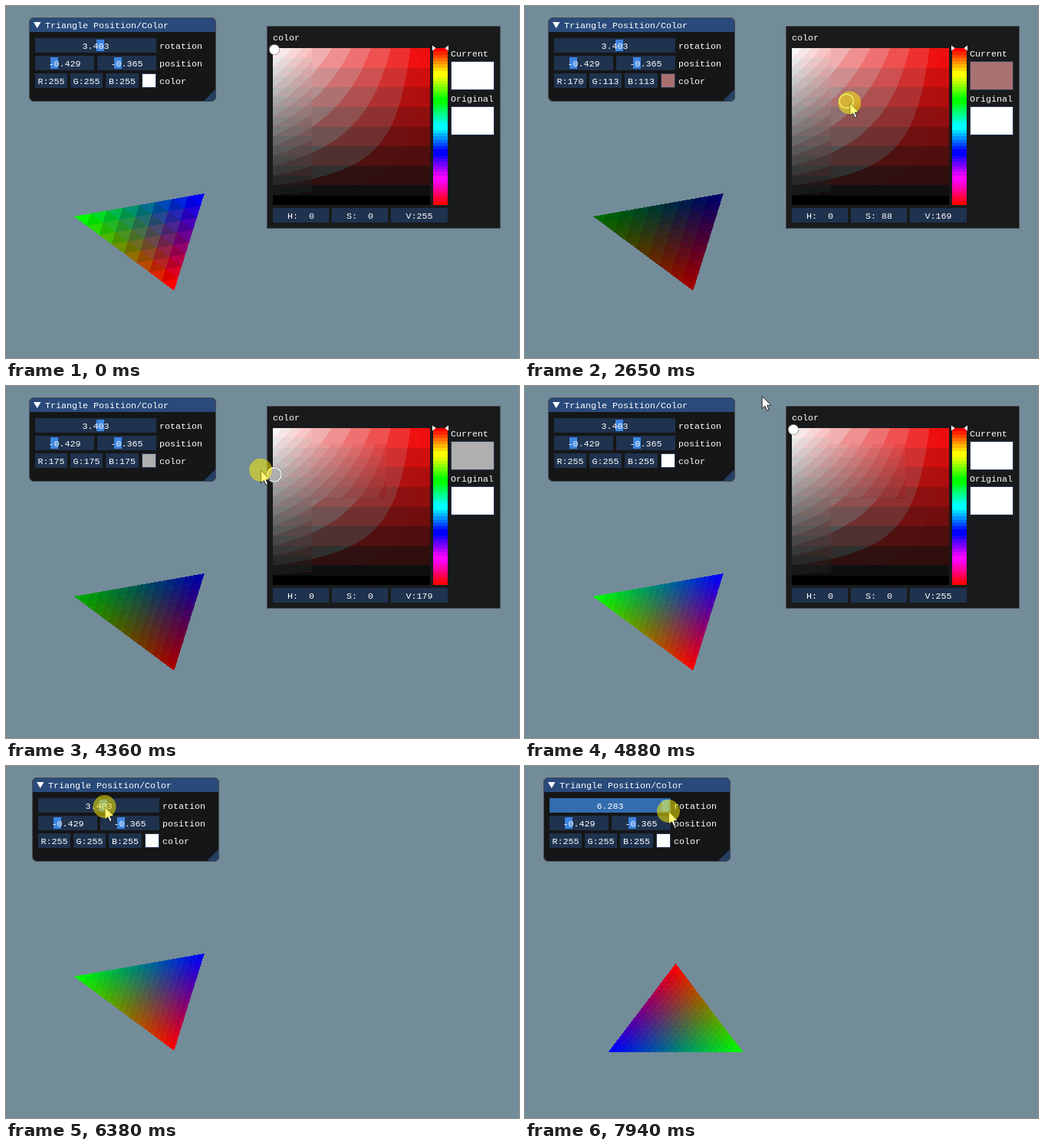
Write an HTML page with a canvas that moves like this. It is 669 by 460 pixels and loops after 8 s.

```html
<!DOCTYPE html>
<html lang="en">
<head>
<meta charset="utf-8">
<title>Triangle editor</title>
<style>
html, body { margin: 0; width: 100%; height: 100%; overflow: hidden; background: #738c99; }
canvas { display: block; }
</style>
</head>
<body>
<canvas id="stage" width="669" height="460"></canvas>
<script>
const ctx = document.getElementById('stage').getContext('2d', { willReadFrequently: true });
const LOOP = 8000, TAU = Math.PI * 2;
const FRAME = '#1f324e', BORDER = '#45484f';

// Pointer path: time, x, y
const path = [
  [360, 528, 452], [560, 420, 250], [690, 351, 135], [770, 373, 103],
  [920, 373, 103], [1080, 365, 58], [1320, 365, 58], [1600, 361, 68],
  [1850, 358, 65], [2000, 358, 65], [2300, 375, 101], [2700, 430, 130],
  [3050, 462, 108], [3400, 482, 71], [3470, 496, 71], [3520, 496, 71],
  [3700, 490, 110], [3950, 420, 135], [4210, 340, 140], [4360, 332, 110],
  [4650, 344, 47], [4800, 335, 20], [5000, 270, 2], [5300, 160, 30],
  [5530, 107, 48], [5800, 125, 53], [6310, 125, 53], [6450, 132, 53],
  [6700, 119, 53], [6880, 119, 53], [7170, 123, 51], [7490, 123, 51],
  [7940, 187, 59]
];
const PICK = [1980, 4680], MOVE = [5960, 6710], SLIDE = [6950, LOOP];
const within = (t, [a, b]) => t >= a && t < b;
const clamp = v => Math.max(0, Math.min(1, v));

function pointer(t) {
  const i = path.findIndex(k => k[0] > t);
  if (i === 0) return path[0].slice(1);
  if (i < 0) return path[path.length - 1].slice(1);
  const [t0, x0, y0] = path[i - 1], [t1, x1, y1] = path[i];
  const f = (t - t0) / (t1 - t0);
  return [x0 + (x1 - x0) * f, y0 + (y1 - y0) * f];
}

// Saturation and value under the pointer while the picker is dragged
function pickedSV(t) {
  if (t < PICK[0]) return [0, 1];
  const [x, y] = pointer(Math.min(t, PICK[1]));
  return [clamp((x - 348) / 205), 1 - clamp((y - 55) / 205)];
}

const level = (v, n) => Math.min(n - 1, Math.floor(v * n));
const middle = (v, n) => v < 1 / 16 && n > 8 || v < .055 ? 0 : (level(v, n) + .5) / n * 255;
const spread = (v, n) => level(v, n) / (n - 1) * 255;

function paint(w, h, colour) {
  const c = document.createElement('canvas');
  c.width = w;
  c.height = h;
  const g = c.getContext('2d'), img = g.createImageData(w, h);
  for (let y = 0, i = 0; y < h; y++)
    for (let x = 0; x < w; x++, i += 4)
      img.data.set([...colour((x + .5) / w, (y + .5) / h), 255], i);
  g.putImageData(img, 0, 0);
  return c;
}

const square = isFine => paint(205, 205, (s, y) => {
  const v = 1 - y, n = isFine(s, y) ? 16 : 8;
  const gb = v * (1 - s);
  return [middle(v, n), gb < .06 ? (v < .06 ? 0 : 14) : middle(gb, n), gb < .06 ? (v < .06 ? 0 : 14) : middle(gb, n)];
});
const coarseSquare = square(s => s < .25);
const fineSquare = square((s, y) => s < .25 || s < .72 && y > .1 && y < .45);
const hueBar = paint(19, 205, (x, y) =>
  [0, 4, 2].map(k => spread(clamp(Math.abs((y * 6 + k) % 6 - 3) - 1), 8)));

function box(x, y, w, h, fill) {
  ctx.fillStyle = fill;
  ctx.fillRect(x, y, w, h);
}

function poly(points, fill) {
  ctx.beginPath();
  points.forEach(p => ctx.lineTo(...p));
  ctx.closePath();
  ctx.fillStyle = fill;
  ctx.fill();
}

function disc(x, y, r, fill) {
  ctx.beginPath();
  ctx.arc(x, y, r, 0, TAU);
  ctx.fillStyle = fill;
  ctx.fill();
}

function label(s, x, y, align = 'left') {
  ctx.font = '11.667px "Liberation Mono", "DejaVu Sans Mono", monospace';
  ctx.textAlign = align;
  ctx.fillStyle = '#fff';
  ctx.fillText(s, x, y);
}

function field(s, x, y, w, fill = FRAME) {
  box(x, y, w, 19, fill);
  label(s, x + w / 2, y + 14, 'center');
}

function slider(value, frac, x, y, w, active) {
  box(x, y, w, 19, active ? '#336caf' : FRAME);
  box(Math.round(x + 2 + frac * (w - 14)), y + 2, 10, 15, active ? '#4296fa' : '#3d85e0');
  label(value.toFixed(3), x + w / 2, y + 14, 'center');
}

function swatch(x, y, w, h, fill) {
  box(x, y, w, h, '#2c3d5c');
  box(x + 1, y + 1, w - 2, h - 2, fill);
}

const channel = (name, v) => name + ':' + String(Math.round(v)).padStart(3);

function drawTriangle(angle, rgb, n) {
  const c = Math.cos(angle), s = Math.sin(angle);
  const [r, g, b] = [[0, 1], [1, -1], [-1, -1]].map(([x, y]) =>
    [196.5 + 88 * (x * c - y * s), 316 - 58 * (x * s + y * c)]);
  const area = (p, q, x, y) => (q[0] - p[0]) * (y - p[1]) - (q[1] - p[1]) * (x - p[0]);
  const total = area(r, g, ...b);
  const X = 65, Y = 226, W = 264, H = 180;
  const img = ctx.getImageData(X, Y, W, H);
  for (let j = 0, i = 0; j < H; j++)
    for (let k = 0; k < W; k++, i += 4) {
      const x = X + k + .5, y = Y + j + .5;
      const wr = area(g, b, x, y) / total, wg = area(b, r, x, y) / total, wb = 1 - wr - wg;
      if (wr < 0 || wg < 0 || wb < 0) continue;
      img.data[i] = spread(wr * rgb[0] / 255, n);
      img.data[i + 1] = spread(wg * rgb[1] / 255, n);
      img.data[i + 2] = spread(wb * rgb[2] / 255, n);
    }
  ctx.putImageData(img, X, Y);
}

function drawWindow(dx, angle, rgb, css, active) {
  ctx.save();
  ctx.translate(dx, 0);
  ctx.save();
  ctx.beginPath();
  ctx.roundRect(30, 15, 244, 110, 7);
  ctx.clip();
  box(30, 15, 244, 110, '#151617');
  box(30, 15, 244, 19, '#294a7a');
  poly([[257, 125], [274, 108], [274, 125]], '#233f63');
  ctx.restore();
  ctx.beginPath();
  ctx.roundRect(30.5, 15.5, 243, 109, 7);
  ctx.strokeStyle = BORDER;
  ctx.stroke();
  poly([[36, 21], [45.5, 21], [40.7, 29]], '#fff');
  label('Triangle Position/Color', 51, 29);

  slider(angle, angle / TAU, 38, 42, 158, active);
  label('rotation', 200, 56);
  slider(-.429, .2855, 38, 65, 77);
  slider(-.365, .3175, 119, 65, 77);
  label('position', 200, 79);
  rgb.forEach((v, i) => field(channel('RGB'[i], v), 38 + 46 * i, 88, i < 2 ? 42 : 43));
  swatch(177, 88, 19, 19, css);
  label('color', 200, 102);
  ctx.restore();
}

function drawPicker(t, [s, v], css) {
  box(340, 26, 305, 265, BORDER);
  box(341, 27, 303, 263, '#191a1b');
  label('color', 348, 45);
  ctx.drawImage(t < 2900 ? coarseSquare : fineSquare, 348, 55);
  ctx.drawImage(hueBar, 557, 55);
  poly([[556, 51.5], [560.5, 55], [556, 58.5]], '#fff');
  poly([[577, 51.5], [572.5, 55], [577, 58.5]], '#fff');

  const x = 348 + Math.max(2, Math.min(203, s * 205));
  const y = 55 + Math.max(2, Math.min(203, (1 - v) * 205));
  const r = within(t, PICK) ? 9.5 : 6;
  disc(x, y, r + 1, '#808080');
  disc(x, y, r + .3, '#fff');
  disc(x, y, r - .9, css);

  field(channel('H', 0), 348, 264, 73);
  field(channel('S', s * 255), 425, 264, 73);
  field(channel('V', v * 255), 502, 264, 74);
  label('Current', 580, 66);
  swatch(580, 72, 57, 38, css);
  label('Original', 580, 125);
  swatch(580, 131, 57, 38, '#fff');
}

function drawPointer(t) {
  const [x, y] = pointer(t);
  ctx.save();
  ctx.translate(x + .5, y + .5);
  poly([[0, 0], [0, 16.5], [3.8, 13], [6.4, 19], [9, 17.9], [6.5, 12], [11.7, 12]], '#fff');
  ctx.strokeStyle = '#222';
  ctx.lineWidth = 1;
  ctx.stroke();
  ctx.restore();
  if ([PICK, MOVE, SLIDE].some(p => within(t, p))) disc(x, y, 15, 'rgba(250,236,0,.53)');
}

function draw(t) {
  // The interface trails the pointer slightly
  const [s, v] = pickedSV(t - 46);
  const rgb = [v, v * (1 - s), v * (1 - s)].map(c => Math.round(c * 255));
  const css = `rgb(${rgb})`;
  const sliding = within(t, SLIDE);
  const angle = sliding ? clamp((pointer(t)[0] - 39) / 144) * TAU : 3.403;
  const dx = t < MOVE[0] ? 0 : Math.round(pointer(Math.min(t, MOVE[1]))[0] - 125);

  ctx.lineWidth = 1;
  box(0, 0, 669, 460, '#738c99');
  drawTriangle(angle, rgb, t < PICK[0] ? 8 : 20);
  drawWindow(dx, angle, rgb, css, sliding);
  if (t < MOVE[0]) drawPicker(t, pickedSV(t - 30), css);
  if (t >= 360) drawPointer(t);
}

const start = performance.now();
function tick() {
  draw((performance.now() - start) % LOOP);
  requestAnimationFrame(tick);
}
tick();
</script>
</body>
</html>
```
